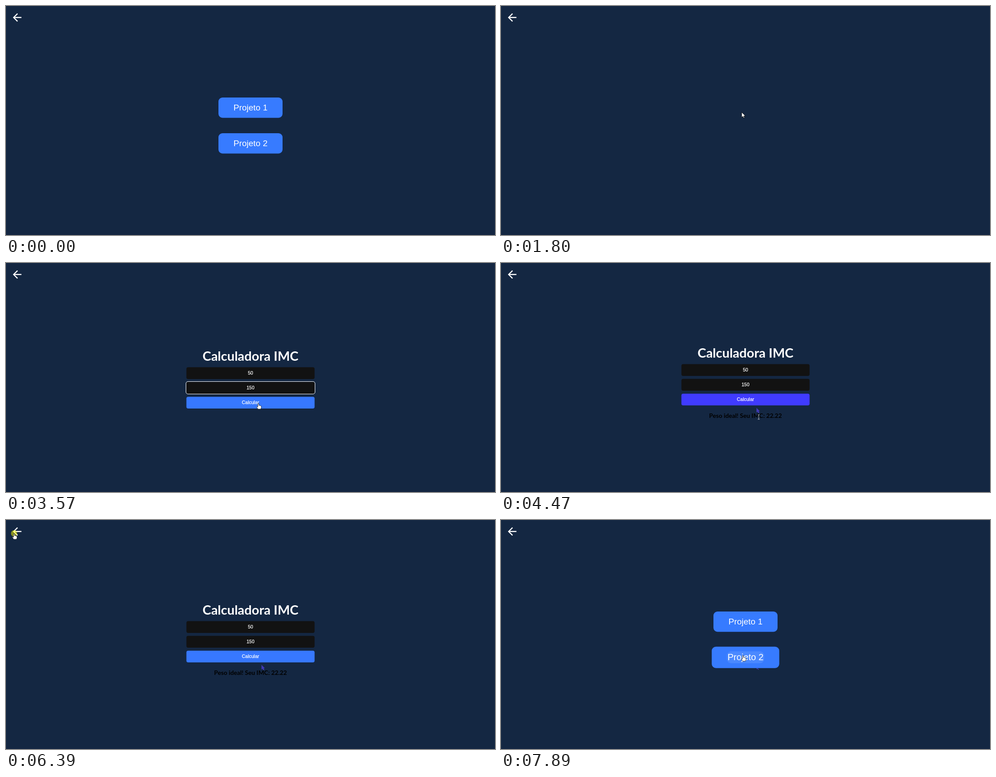
Animation of 1091x513 px, one loop 7.99 s. Source, as an HTML page:

```html
<!DOCTYPE html>
<html lang="pt">
<head>
<meta charset="utf-8">
<title>Calculadora IMC</title>
<style>
  html, body { margin: 0; width: 100%; height: 100%; overflow: hidden; background: #142742; }
  svg { display: block; width: 1091px; height: 513px; }
  text { text-anchor: middle; fill: #fff; font-family: "Liberation Sans", Arial, sans-serif; }
  .link text { font-size: 19px; }
  .small { font-size: 10.5px; }
  .strong { stroke: #fff; stroke-width: .25px; }
  .lato { font-family: Lato, sans-serif; font-weight: 700; }
  .field { fill: #121212; }
  .ring { fill: none; stroke: #fff; stroke-width: 1; }
</style>
</head>
<body>
<svg viewBox="0 0 1091 513">
  <rect width="1091" height="513" fill="#142742"/>
  <rect y="511.5" width="1091" height="1.5" fill="#132440"/>
  <path transform="translate(10.6 11.5) scale(1.19)" fill="#fff"
    d="M20 11H7.83L13.42 5.41L12 4L4 12L12 20L13.41 18.59L7.83 13H20Z"/>

  <g id="menu">
    <g class="link" id="link1">
      <rect x="474" y="205" width="143" height="45.5" rx="9" fill="#377bff"/>
      <rect class="glow" x="506" y="215" width="79" height="25" rx="9" fill="#fff"/>
      <text x="545.5" y="233.5">Projeto 1</text>
    </g>
    <g class="link" id="link2">
      <rect x="474" y="285" width="143" height="45.5" rx="9" fill="#377bff"/>
      <rect class="glow" x="506" y="295" width="79" height="25" rx="9" fill="#fff"/>
      <text x="545.5" y="313.5">Projeto 2</text>
    </g>
  </g>

  <g id="calc">
    <text class="lato" x="545.5" y="218.5" font-size="29">Calculadora IMC</text>
    <rect class="field" x="402.5" y="233.5" width="286" height="26.4" rx="4"/>
    <rect class="field" x="402.5" y="266.6" width="286" height="26.4" rx="4"/>
    <rect class="ring" id="ring" x="401.5" width="288" height="28" rx="4.5"/>
    <text class="small" id="weight" x="545.5" y="249.6"></text>
    <text class="small" id="height" x="545.5" y="282.8"></text>
    <rect id="button" x="402.5" y="299.7" width="286" height="26.4" rx="4"/>
    <text class="small strong" x="545.5" y="316">Calcular</text>
    <text class="lato" id="result" x="545.5" y="354" font-size="13.7" style="fill:#000">Peso ideal! Seu IMC: 22.22</text>
  </g>

  <path id="trail" fill="#4039b4"/>
  <circle id="click" r="7" fill="#ff0" fill-opacity=".5"/>
  <g id="cursor">
    <path id="arrow" d="M0 0V11.5L2.7 9L4.5 13L6.3 12.2L4.6 8.3H8.2Z" fill="#fff" stroke="#000" stroke-width=".8"/>
    <path id="hand" d="M-1.1 1Q0-.6 1.1 1V5L2.6 5Q3.2 4.7 3.8 5.5Q5 5.2 5.4 6.2Q6.5 6.1 6.6 7.2V9.4Q6.4 11.6 5.2 13.2H-.8Q-2.5 10.8-3.9 8.6Q-3.6 6.8-1.1 8.6Z" fill="#fff" stroke="#111" stroke-width=".8"/>
    <path id="beam" d="M-2.2-5H2.2M0-5V5M-2.2 5H2.2" fill="none" stroke="#b9c0ca" stroke-width="1"/>
  </g>
</svg>

<script>
const $ = id => document.getElementById(id);
const LOOP = 7990;
const clamp = v => Math.min(1, Math.max(0, v));
const between = (t, a, b) => t >= a && t < b;
const show = (node, on) => node.style.display = on ? "" : "none";

// CSS "ease": cubic-bezier(.25, .1, .25, 1)
function ease(x) {
  x = clamp(x);
  let lo = 0, hi = 1;
  for (let i = 0; i < 24; i++) {
    const u = (lo + hi) / 2, v = 1 - u;
    if (.75 * v * u + u * u * u < x) lo = u; else hi = u;
  }
  const u = lo, v = 1 - u;
  return .3 * v * v * u + 3 * v * u * u + u * u * u;
}

const rates = [[0, 40], [40, 100], [1800, 100], [2800, 64], [3570, 100], [6390, 100]];
function tick(t) {
  const [start, step] = rates.findLast(r => r[0] <= t);
  return start + Math.floor((t - start) / step) * step;
}

// Pointer path: time, x, y, shape from that time on
const path = [
  [40, 951, 472, "arrow"], [300, 740, 385, "arrow"], [440, 612, 322, "hand"],
  [560, 560, 282, "arrow"], [740, 541, 253, "arrow"], [840, 538, 246, "hand"],
  [940, 536, 236, "hand"], [1540, 537, 238, "hand"], [1800, 537, 238, "arrow"],
  [2000, 538, 237, "arrow"], [2200, 539, 231, "beam"], [2400, 539, 231, "beam"],
  [2700, 541, 248, "beam"], [3050, 541, 248, "beam"], [3250, 545, 281, "beam"],
  [3420, 546, 281, "beam"], [3530, 563, 314, "hand"], [4070, 563, 314, "hand"],
  [4370, 570, 325, "arrow"], [4470, 575, 345, "beam"], [4770, 574, 356, "arrow"],
  [4870, 568, 350, "arrow"], [5220, 330, 205, "arrow"], [5570, 111, 56, "arrow"],
  [5870, 50, 38, "arrow"], [6070, 18, 30, "hand"], [6690, 18, 30, "arrow"],
  [6950, 320, 120, "arrow"], [7190, 538, 187, "arrow"], [7390, 540, 206, "hand"],
  [7560, 541, 252, "arrow"], [7735, 541, 286, "hand"], [7890, 540, 303, "hand"]
];
function pointer(t) {
  const i = path.findLastIndex(k => k[0] <= t);
  if (i < 0) return null;
  const a = path[i], b = path[i + 1] || a;
  const p = b === a ? 0 : (t - a[0]) / (b[0] - a[0]);
  return { x: a[1] + (b[1] - a[1]) * p, y: a[2] + (b[2] - a[2]) * p, shape: a[3] };
}

const hovers = [
  { node: $("link1"), y: 227.75, spans: [[850, 1800], [7390, 7500]] },
  { node: $("link2"), y: 307.75, spans: [[440, 560], [7735, 9000]] }
];
function hover(t, spans) {
  const span = spans.findLast(s => s[0] <= t);
  if (!span) return 0;
  const level = ease((Math.min(t, span[1]) - span[0]) / 500);
  return level * (1 - ease((t - span[1]) / 250));
}

// Pages fade in while sliding from the upper left
function place(node, p, dy) {
  const off = -50 * (1 - p);
  node.setAttribute("transform", `translate(${off} ${off + dy})`);
  node.setAttribute("opacity", p);
}

const enter = (t, start) => ease((t - start) / 560);
const clicks = [[1640, 1800], [2800, 2920], [3260, 3380], [3870, 4070], [6390, 6590]];
const calm = [55, 120, 255], deep = [64, 59, 255];

function type(node, t, value, times, hint) {
  const n = times.filter(s => s <= t).length;
  node.textContent = n ? value.slice(0, n) : hint;
  node.style.fill = n ? "#fff" : "#757575";
  node.classList.toggle("strong", n > 0);
}

function draw(now) {
  const t = tick(now);

  const onCalc = between(t, 1930, 6590);
  show($("menu"), t < 1800 || t > 6690);
  show($("calc"), onCalc);
  place($("menu"), t < 1800 ? 1 : enter(t, 6690), 0);

  for (const { node, y, spans } of hovers) {
    const h = hover(t, spans), s = 1 + h * .1;
    node.setAttribute("transform", `translate(545.5 ${y}) scale(${s}) translate(-545.5 ${-y})`);
    node.querySelector(".glow").setAttribute("opacity", .1 * clamp((h - .22) / .25));
  }

  const done = t >= 4070;
  place($("calc"), enter(t, 1930), done ? -7 : 0);
  type($("weight"), t, "50", [2920, 2990], "Peso em (kg) Ex: 98");
  type($("height"), t, "150", [3300, 3370, 3430], "Altura em (cm) Ex: 180");
  show($("ring"), between(t, 2800, 4070));
  $("ring").setAttribute("y", t < 3250 ? 232.5 : 265.5);
  show($("result"), done);
  const m = ease((t - 3570) / 300) * (1 - ease((t - 4470) / 300));
  $("button").setAttribute("fill", `rgb(${calm.map((c, i) => Math.round(c + (deep[i] - c) * m))})`);

  // Stain the pointer leaves behind on its way down
  show($("trail"), t >= 4370);
  $("trail").setAttribute("d", t < 6590
    ? "M570 324.5V335L572.3 333L574 336.5L576.5 335.6L575 332H577.5Z"
    : "M570 332H573L575.5 335L574 335.6L572.2 333.2L570 334Z");

  const at = pointer(t);
  show($("cursor"), at);
  show($("click"), at && clicks.some(c => between(t, ...c)));
  if (at) {
    const move = `translate(${at.x} ${at.y})`;
    $("cursor").setAttribute("transform", move);
    $("click").setAttribute("transform", move);
    for (const id of ["arrow", "hand", "beam"]) show($(id), id === at.shape);
  }
}

const begin = performance.now();
function frame() {
  draw((performance.now() - begin) % LOOP);
  requestAnimationFrame(frame);
}
frame();
</script>
</body>
</html>
```
